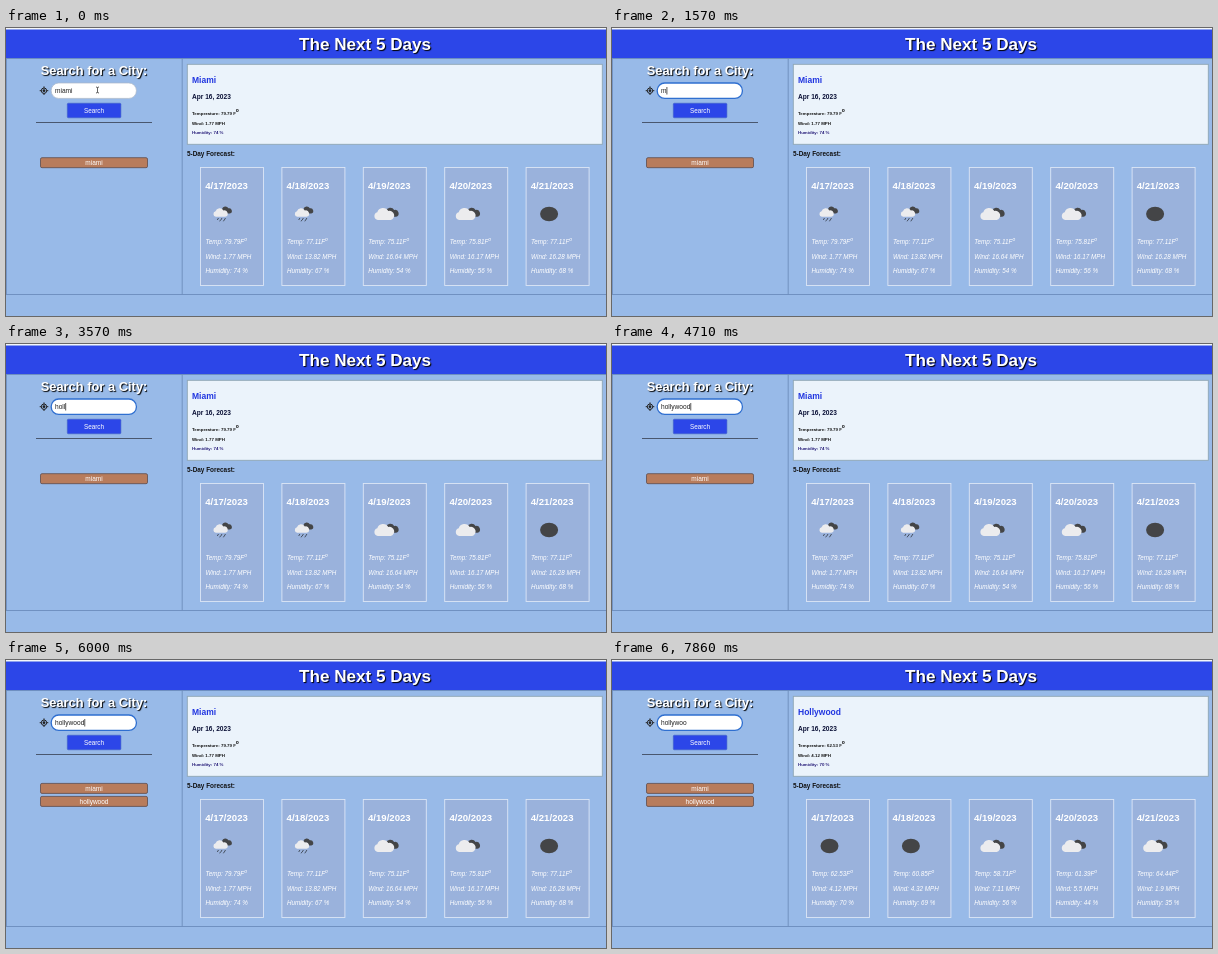
These frames come from a looping animation (600 by 288 pixels, 8000 ms). An HTML page:

```html
<!DOCTYPE html>
<html lang="en">
<head>
<meta charset="utf-8">
<title>The Next 5 Days</title>
<style>
  html, body { margin: 0; width: 100%; height: 100%; overflow: hidden; background: #98bae8; }
  svg { display: block; width: 600px; height: 288px; font-family: "Liberation Sans", Arial, sans-serif; }
  text { white-space: pre; }
  .b { font-weight: bold; }
  .shade { fill: #fff; font-weight: bold; text-shadow: 1px 1px 1px #000; }
  .info { fill: #fff; font-style: italic; font-size: 6.3px; }
</style>
</head>
<body>
<svg id="stage" viewBox="0 0 600 288"></svg>
<script>
const LOOP = 8000, BLUE = '#2c46e8';
const FOCUS = 430, TYPING = 1000, SAVED = 5990, LOADED = 6130;

// Input edits: time and resulting value
const edits = [
  [0, 'miami'], [1000, 'miam'], [1140, 'mia'], [1290, 'mi'], [1430, 'm'], [1710, ''],
  [2860, 'h'], [3140, 'ho'], [3290, 'hol'], [3430, 'holl'], [3860, 'holly'], [4000, 'hollyw'],
  [4290, 'hollywo'], [4430, 'hollywoo'], [4570, 'hollywood'], [7570, 'hollywoo']
];

// Each day: temperature, wind, humidity, icon
const reports = {
  Miami: [[79.79, 1.77, 74, 'rain'], [77.11, 13.82, 67, 'rain'], [75.11, 16.64, 54, 'clouds'],
          [75.81, 16.17, 56, 'clouds'], [77.11, 16.28, 68, 'clear']],
  Hollywood: [[62.53, 4.12, 70, 'clear'], [60.85, 4.32, 69, 'clear'], [58.71, 7.11, 56, 'clouds'],
              [61.39, 5.5, 44, 'clouds'], [64.44, 1.9, 35, 'clouds']]
};

const text = (x, y, size, fill, s, extra = '') =>
  `<text x="${x}" y="${y}" font-size="${size}" fill="${fill}" ${extra}>${s}</text>`;
const rect = (x, y, w, h, fill, extra = '') =>
  `<rect x="${x}" y="${y}" width="${w}" height="${h}" fill="${fill}" ${extra}/>`;
const line = (d, stroke, width = 1) => `<path d="${d}" fill="none" stroke="${stroke}" stroke-width="${width}"/>`;
const BOLD = 'class="b"', MID = 'text-anchor="middle"';
const degree = (size, rise) => `<tspan font-size="${size}" dy="${-rise}">o</tspan>`;

const cloud = (x, y, k, fill) => `<path transform="translate(${x} ${y}) scale(${k})" fill="${fill}"
  d="M4 13A4 4 0 0 1 3.5 5.2A6 6 0 0 1 14.5 4A4.5 4.5 0 0 1 17 13Z"/>`;
const icons = {
  clear: '<ellipse cx="23" cy="46.5" rx="9" ry="7.3" fill="#444547"/>',
  clouds: cloud(20, 39.5, .75, '#444547') + cloud(10.5, 39.5, 1, '#ececee'),
  rain: cloud(19.5, 38.5, .58, '#444547') + cloud(12.5, 40, .72, '#ececee') +
    line('M18 50.5l-1.2 2M21.5 50.5l-1.2 2M25 50.5l-1.2 2M20 52.5l-.8 1.3M23.7 52.5l-.8 1.3', '#303840', .8)
};

const card = ([temp, wind, humidity, icon], i) =>
  `<g transform="translate(${194.5 + i * 81.4} 139.5)">` +
  rect(0, 0, 63, 118, '#9ab2dc', 'stroke="#dce6f6" stroke-width=".9"') +
  text(4.7, 21.5, 9.6, '#fff', `4/${17 + i}/2023`, BOLD) + icons[icon] +
  text(5, 76.7, 6.3, '#fff', `Temp: ${temp}F${degree(5, 3)}`, 'class="info"') +
  text(5, 91.2, 6.3, '#fff', `Wind: ${wind} MPH`, 'class="info"') +
  text(5, 105.5, 6.3, '#fff', `Humidity: ${humidity} %`, 'class="info"') + '</g>';

const pastCity = (y, name) =>
  rect(34.5, y, 107, 10, '#b87c5c', 'rx="1.5" stroke="#5f4c4c" stroke-width=".8"') +
  text(88, y + 7.3, 6.5, '#fff', name, MID);

const locator = '<circle cx="38" cy="62.7" r="2.7" fill="none" stroke="#222" stroke-width="1"/>' +
  '<circle cx="38" cy="62.7" r="1.4" fill="#222"/>' +
  line('M38 58.4v1.8M38 65.2v1.8M33.7 62.7h1.8M40.5 62.7h1.8', '#222');

const ruler = document.createElement('canvas').getContext('2d');
ruler.font = '66px "Liberation Sans", Arial, sans-serif';

function inputBox(t) {
  const [since, value] = edits.findLast(e => t >= e[0]);
  const focused = t >= FOCUS;
  const blinkOn = (t - Math.max(since, FOCUS)) % 1000 < 500 && t < 7570;
  const caret = 49.4 + ruler.measureText(value).width / 10;
  return rect(45.2, 55, 85.2, 15.4, '#fff',
      `rx="7.5" stroke="${focused ? '#2f6fd0' : '#a9b6c8'}" stroke-width="${focused ? 1.3 : .7}"`) +
    text(49, 65, value ? 6.6 : 6.3, value ? '#222' : '#777', value || 'City, State') +
    (focused && blinkOn ? line(`M${caret} 59v7.5`, '#111', .7) : '') +
    (t < TYPING ? line('M90 59q1.2 0 1.5 .8q.3-.8 1.5-.8M91.5 59.6v4.8M90 65q1.2 0 1.5-.8q.3 .8 1.5 .8', '#222', .7) : '');
}

function currentPanel(city, [temp, wind, humidity]) {
  return rect(181.3, 36.3, 415, 80, '#ebf3fb', 'stroke="#8ea6b4" stroke-width=".9"') +
    text(186, 55.3, 8.5, '#2136e0', city, BOLD) +
    text(186, 71, 6.6, '#0c1238', 'Apr 16, 2023', BOLD) +
    text(186, 87, 4.4, '#111', `Temperature: ${temp.toFixed(2)} F${degree(5, 3.4)}`, BOLD) +
    text(186, 97.2, 4.4, '#111', `Wind: ${wind} MPH`, BOLD) +
    text(186, 106.3, 4.4, '#241a78', `Humidity: ${humidity} %`, BOLD);
}

function scene(t) {
  const city = t < LOADED ? 'Miami' : 'Hollywood';
  const days = reports[city];
  return rect(0, 0, 600, 288, '#98bae8') + rect(0, 0, 600, 1.6, '#f4f6fa') +
    rect(0, 1.6, 600, 28.6, BLUE) +
    line('M0 30.5H600M.4 30V266.5M176.2 30V266.5M0 266.5H600', '#6c8dbd', .9) +
    text(293, 22, 17.1, '#fff', 'The Next 5 Days', 'class="shade"') +
    text(88, 47, 12.9, '#fff', 'Search for a City:', `class="shade" ${MID}`) +
    locator + inputBox(t) +
    rect(61.3, 75.2, 53.6, 14.6, BLUE, 'rx="1" stroke="#4264c8" stroke-width=".6"') +
    text(88, 84.8, 6.4, '#fff', 'Search', MID) +
    line('M30 94.5H146', '#414c60', .9) +
    (t < SAVED ? pastCity(129.7, 'miami') : pastCity(123.4, 'miami') + pastCity(136.4, 'hollywood')) +
    currentPanel(city, days[0]) +
    text(181, 128.4, 6.4, '#111', '5-Day Forecast:', BOLD) +
    days.map(card).join('');
}

const stage = document.getElementById('stage');
const start = performance.now();
let shown = '';
function draw() {
  const next = scene((performance.now() - start) % LOOP);
  if (next !== shown) stage.innerHTML = shown = next;
  requestAnimationFrame(draw);
}
draw();
</script>
</body>
</html>
```
